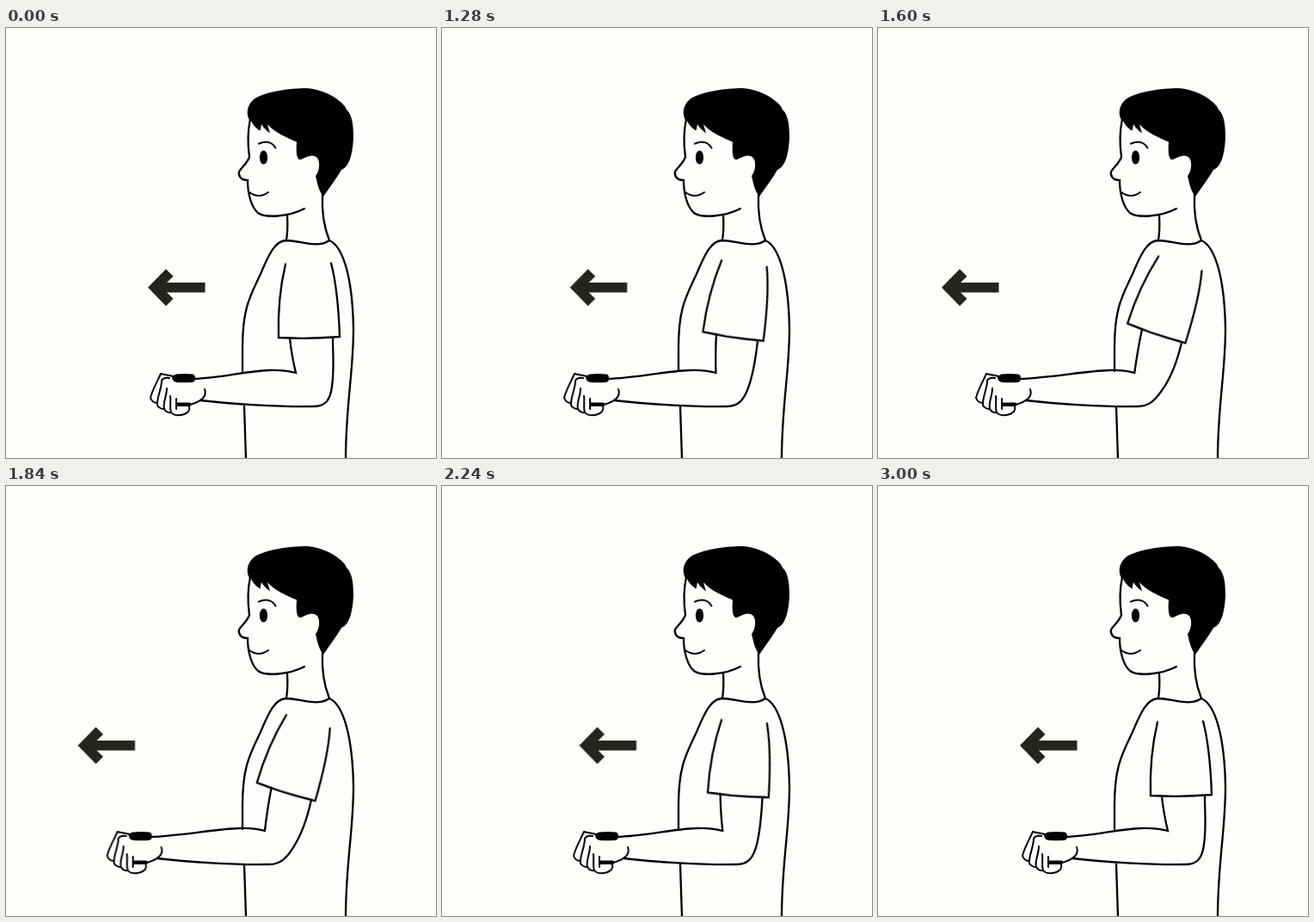
Write an HTML page that moves like this. It is 500 px wide and 500 px high and loops after 4000 ms.

```html
<!DOCTYPE html>
<html lang="en">
<head>
<meta charset="utf-8">
<title>Arm reach</title>
<style>
  html, body { margin: 0; width: 100%; height: 100%; overflow: hidden; background: #fefefb; }
  svg { display: block; width: 100%; height: 100%; }

  .ink { fill: none; stroke: #000; stroke-width: 2.3; stroke-linecap: round; stroke-linejoin: miter; }
  .thin { stroke-width: 2; stroke-linejoin: round; }
  .solid { fill: #000; stroke: none; }

  /* 2 s out and 2 s mirrored back, furthest reach at 1.7 s, long rest between */
  .arm, .arrow { animation: 2s -.3s infinite alternate; }
  .arm { animation-timing-function: linear(0, 0 60%, .012 65%, .43 79%, .9 95%, 1); }
  .arrow { animation-timing-function: linear(0, 0 60%, .0055 65%, .088 77%, .176 79%, .593 87%, 1 95%, 1); }

  .arrow { fill: #25251c; animation-name: arrow; }
  .hand { animation-name: hand; }
  .sleeve { animation-name: sleeve; transform-origin: 351.5px 273.5px; }
  .inner { animation-name: inner; d: path("M218 408C250 407 278 399 305 398Q322 397 337 401Q332 380 330 361"); }
  .outer { animation-name: outer; d: path("M380 361C380 380 382 396 379 417C377 432 372 440 358 440C320 441 260 437 226 433"); }

  @keyframes arrow {
    from { transform: translateX(0); }
    to { transform: translateX(-91px); }
  }
  @keyframes hand {
    from { transform: translateX(0); }
    to { transform: translateX(-60px); }
  }
  @keyframes sleeve {
    from { transform: rotate(0deg); }
    to { transform: rotate(21.6deg); }
  }
  @keyframes inner {
    to { d: path("M158 408C192 407 236 399 264 398Q280 397 294 401Q299 371 304.5 349"); }
  }
  @keyframes outer {
    to { d: path("M350 366.5C345.5 383.5 337 406 326 420C316 434 308 440 296 440C258 441 200 437 166 433"); }
  }
</style>
</head>
<body>
<svg viewBox="0 0 500 500">
  <!-- head -->
  <g class="ink">
    <path d="M284 106C281 120 281 136 283 150C280 158 274 162 271 167C270 172 273 177 281 177C281 192 285 208 293 215C301 221 328 220 347 210"/>
    <path class="thin" d="M283 191Q294 199 305 191"/>
    <path class="thin" d="M294 134.5C302 131 309 132 313.5 139.5"/>
    <ellipse class="solid" cx="299.5" cy="150.5" rx="4.6" ry="8"/>
    <path class="solid" d="M283 107C279 100 280 90 288 83C301 74 328 70 350 70C367 71 385 80 394 91L396 95C403 101 404 115 404 128C403 145 400 161 390 165C384 175 376 186 369 196C364 190 362 181 360 172C364 167 366 157 362 151C357 146 351 149 343 153C338 154 337 145 338 132.5C326 127 313 122 304 112L307 122.5Q300 117 297 112L295.5 119.5Q288 115 285 108Z"/>
  </g>

  <!-- neck and torso -->
  <g class="ink">
    <path d="M327 218Q328 234 326 247"/>
    <path d="M368 194C367 214 370 232 376 247"/>
    <path d="M275 399V372C275 325 284 312 296 286C306 262 313 248 325 247C342 247 362 257 376 247C392 254 403 290 404 350C404 400 395 440 395 501"/>
    <path d="M277 440L279 501"/>
  </g>

  <path class="arrow" d="M165 301.7L186 280.3L194.5 288.8L187 296H231.5V307.5H187L194.5 314.8L186 323.3Z"/>

  <!-- arm -->
  <g class="ink">
    <path class="arm inner"/>
    <path class="arm outer"/>
    <path class="arm sleeve" d="M325 274.5C319 300 316 330 317 360Q352 362 388 359C387 330 385 300 378 273.5"/>
    <g class="arm hand">
      <g class="thin">
        <path d="M196 406C191 403 186 404 180 402C176 411 170 421 168 430Q170 436 176 436"/>
        <path d="M190 407Q183 406 181 410C181 420 175 430 176 439Q179 443 184 443"/>
        <path d="M187 419C187 428 182 436 184 443Q187 448 192 447"/>
        <path d="M191 428C192 434 190 441 192 447C196 452 207 451 212 446Q214 443 213 440"/>
        <path d="M198 431V443"/>
        <path d="M231 420C234 428 228 434 214 438"/>
      </g>
      <path class="solid" d="M198 402.5Q207 401.5 217 402.5Q220 403 220 407Q220 411 217 412Q207 412.7 198 412Q194 411 193 407Q194 403 198 402.5Z"/>
      <rect class="solid" x="198" y="435.5" width="17" height="4.6" rx="1.5"/>
    </g>
  </g>
</svg>
</body>
</html>
```
